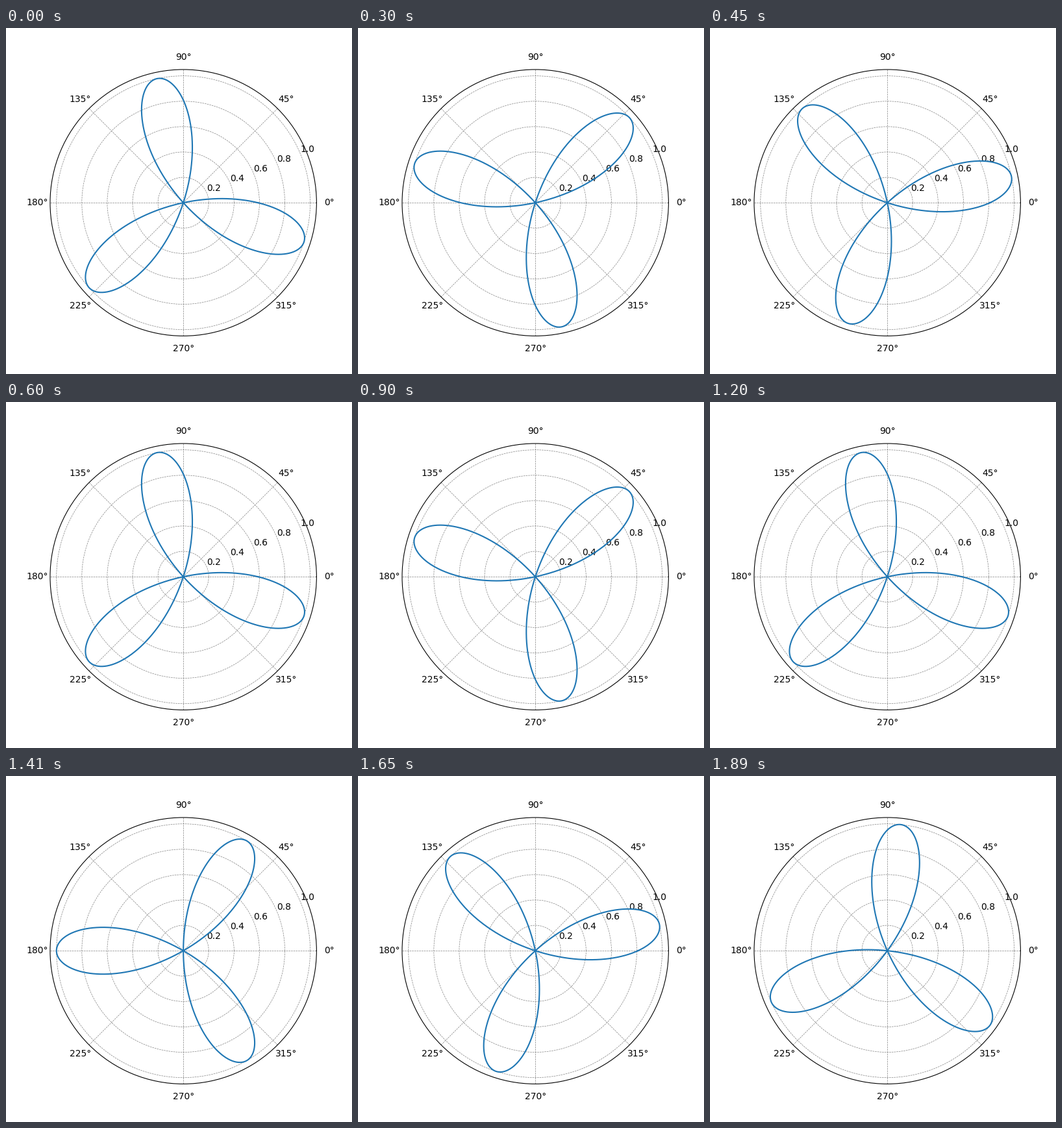
A matplotlib script for the animation above (1920 ms loop, 533x533 px).

```python
import numpy as np
import matplotlib.pyplot as plt
from matplotlib.animation import FuncAnimation

FRAMES = 64
INTERVAL = 30  # ms
PETALS = 3

fig = plt.figure(figsize=(5.33, 5.33), dpi=100, facecolor="white")
ax = fig.add_subplot(projection="polar")
ax.set_ylim(0, 1.05)
ax.set_yticks([0.2, 0.4, 0.6, 0.8, 1.0])
ax.grid(color="gray", linestyle="--", linewidth=0.5)

theta = np.linspace(0, 2 * np.pi, 1441)
line, = ax.plot([], [], color="tab:blue", linewidth=1.5)


def update(i):
    # The rose turns clockwise by 6 degrees per frame.
    r = np.cos(PETALS * theta + 0.1 * np.pi * (i + 3))
    line.set_data(theta, np.maximum(r, 0))
    return line,


anim = FuncAnimation(fig, update, frames=FRAMES, interval=INTERVAL,
                     repeat=True, repeat_delay=0)
plt.show()
```
